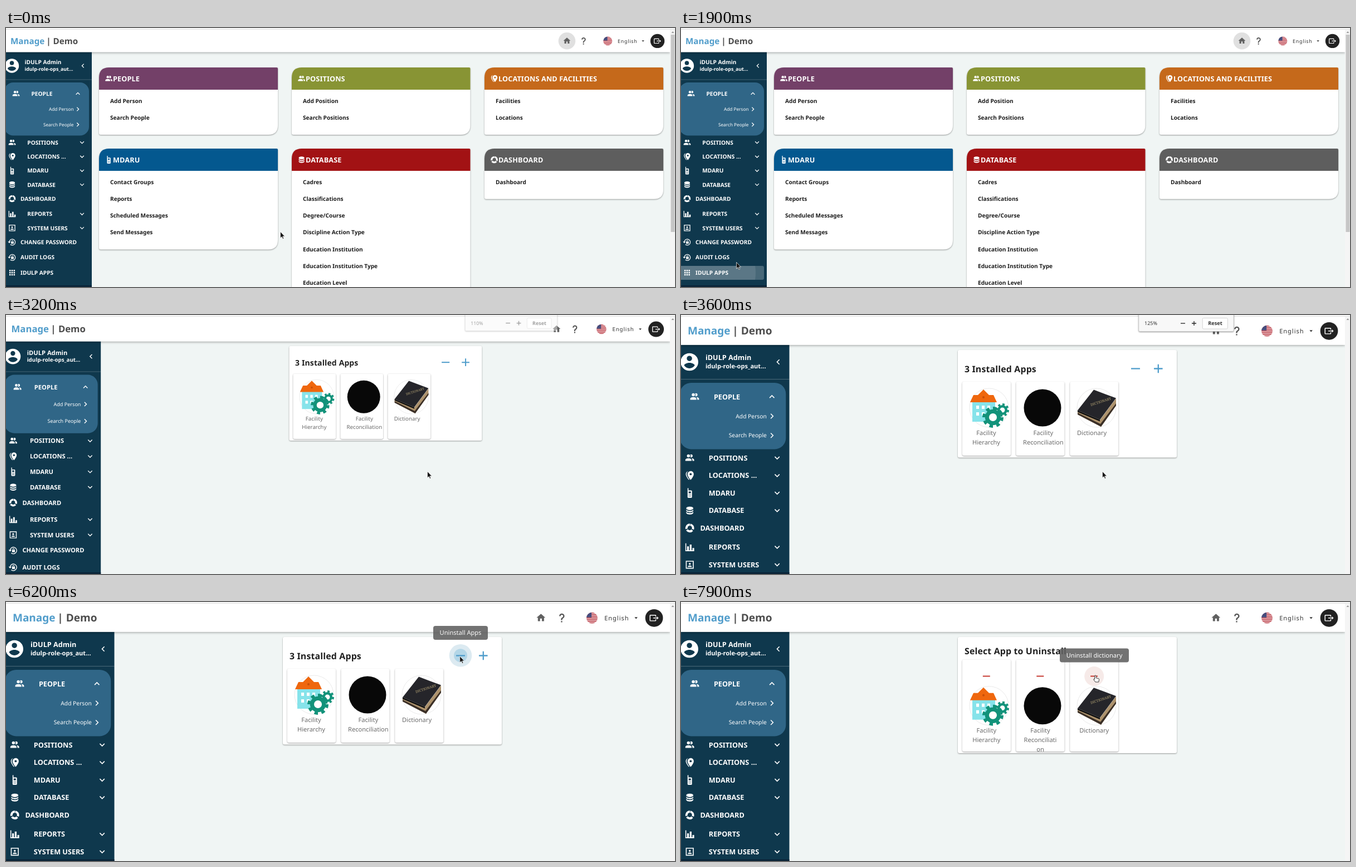
Animation of 1201 by 466 pixels, one loop 8 s. Source, as an HTML page:

```html
<!DOCTYPE html>
<html lang="en">
<head>
<meta charset="utf-8">
<title>Manage | Demo</title>
<style>
html, body { margin: 0; width: 100%; height: 100%; overflow: hidden; background: #f0f5f4; }
svg { display: block; width: 1201px; height: 466px; font-family: "Noto Sans", "Open Sans", sans-serif; text-rendering: geometricPrecision; }
.lift { filter: drop-shadow(0 1px 1.2px rgba(0,0,0,.38)); }
#bar { filter: drop-shadow(0 1.3px 2.2px rgba(0,0,0,.36)); }
</style>
</head>
<body>
<svg id="stage" viewBox="0 0 1201 466" xmlns="http://www.w3.org/2000/svg"></svg>
<script>
const LOOP = 8000, STEP = 100, RIGHT = 1193.5, MID = 693.75;
const stage = document.getElementById('stage');

const line = (d, w = 2) => `<path d="${d}" fill="none" stroke="currentColor" stroke-width="${w}"/>`;
const fill = d => `<path d="${d}" fill-rule="evenodd"/>`;
const rect = (x, y, w, h, c, more = '') => `<rect x="${x}" y="${y}" width="${w}" height="${h}" fill="${c}" ${more}/>`;
const circle = (x, y, r, c, more = '') => `<circle cx="${x}" cy="${y}" r="${r}" fill="${c}" ${more}/>`;
const text = (s, x, y, size, c, weight = 700, more = '') =>
  `<text x="${x}" y="${y}" font-size="${size}" fill="${c}" font-weight="${weight}" ${more}>${s}</text>`;
const middle = 'text-anchor="middle"';

// Icons on a 24 unit grid
const icons = {
  people: circle(9, 7.5, 3.5, 'currentColor') + fill('M16 17v2H2v-2s0-4 7-4 7 4 7 4z') +
    fill('M15.94 13A5.3 5.3 0 0 1 18 17v2h4v-2s0-3.630-6.060-4z') +
    fill('M15 4a3.400 3.400 0 0 0-1.930.6 5 5 0 0 1 0 5.800A3.400 3.400 0 0 0 15 11a3.500 3.500 0 0 0 0-7z'),
  pin: fill('M14 2c3.860 0 7 3.130 7 7 0 5.250-7 13-7 13S7 14.250 7 9a7 7 0 0 1 7-7zm0 4.500a2.500 2.500 0 1 0 0 5 2.500 2.500 0 0 0 0-5z') +
    fill('M5 9c0 4.500 5.080 10.660 6 11.800L10 22S3 14.250 3 9c0-3.170 2.110-5.850 5-6.710C6.160 3.940 5 6.330 5 9z'),
  phone: fill('M7 1h2v5h6q2 0 2 2v13q0 2-2 2H9q-2 0-2-2zM9.500 8.500v4h5v-4zM9.500 15v1.500h2V15zM12.500 15v1.500h2V15zM9.500 18.500V20h2v-1.500zM12.500 18.500V20h2v-1.500z'),
  base: '<ellipse cx="12" cy="7" rx="8" ry="4"/>' +
    [9, 14].map(y => fill(`M4 ${y}v3c0 2.210 3.580 4 8 4s8-1.790 8-4v-3c0 2.210-3.580 4-8 4s-8-1.790-8-4z`)).join(''),
  donut: '<circle cx="12" cy="12" r="7.500" fill="none" stroke="currentColor" stroke-width="5" stroke-dasharray="13.500 2.208" transform="rotate(-82 12 12)"/>',
  bars: fill('M22 21H2V3h2v16h2v-9h4v9h2V6h4v13h2v-5h4z'),
  badge: line('M4 4h16v16H4z') + circle(12, 10, 2.25, 'currentColor') + fill('M7.500 17v-.75c0-1.500 3-2.250 4.500-2.250s4.500.75 4.500 2.250V17z'),
  lock: line('M4 13a8.500 8.500 0 1 1 3 6') + fill('M0 11h8l-4 4.500z') +
    fill('M9 11h7.500v6H9z') + line('M10.700 11V9.500a2 2 0 0 1 4 0V11', 1.500),
  grid: [4, 10, 16].map(x => [4, 10, 16].map(y => rect(x, y, 4, 4, 'currentColor')).join('')).join(''),
  user: fill('M12 2a10 10 0 1 0 0 20 10 10 0 0 0 0-20zm0 3a3 3 0 1 1 0 6 3 3 0 0 1 0-6zm0 14.200c-2.500 0-4.710-1.280-6-3.200.03-2 4-3.100 6-3.100s5.970 1.100 6 3.100a7.230 7.230 0 0 1-6 3.200z'),
  down: line('M6.700 9.300l5.300 5.300 5.300-5.300'),
  up: line('M6.700 14.700l5.300-5.300 5.300 5.300'),
  next: line('M9.300 6.700l5.300 5.300-5.300 5.300'),
  back: line('M14.700 6.700L9.400 12l5.300 5.300'),
  home: fill('M10 20v-6h4v6h5v-8h3L12 3 2 12h3v8z'),
  help: fill('M10 19h3v3h-3zM12 2c5.350.22 7.680 5.620 4.500 9.670-.83 1-2.170 1.660-2.830 2.500C13 15 13 16 13 17h-3c0-1.670 0-3.080.67-4.080.66-1 2-1.590 2.830-2.250C15.920 8.430 15.320 5.260 12 5a3 3 0 0 0-3 3H6a6 6 0 0 1 6-6z'),
  exit: fill('M23 12l-4-4v3h-9v2h9v3z') + line('M16 9V6q0-1-1-1H3Q2 5 2 6v12q0 1 1 1h12q1 0 1-1v-3')
};
const icon = (name, x, y, c = '#fff', size = 15.2) =>
  `<g transform="translate(${x - size / 2} ${y - size / 2}) scale(${size / 24})" color="${c}" fill="currentColor">${icons[name]}</g>`;

function dashCard(x, y, w, color, glyph, title, items) {
  const head = y + 40, end = head + 20.6 + 30.2 * items.length, r = x + w;
  return `<path class="lift" fill="#fff" d="M${x + 18} ${y}H${r - 2}q2 0 2 2V${end - 17}q0 17-17 17H${x + 3}q-3 0-3-3V${y + 18}q0-18 18-18z"/>` +
    `<path fill="${color}" d="M${x + 18} ${y}H${r - 2}q2 0 2 2V${head}H${x}V${y + 18}q0-18 18-18z"/>` +
    icon(glyph, x + 17.6, y + 20, '#fff', 15.2) +
    text(title, x + 25, y + 24.7, 12.66, '#fff', 700, 'letter-spacing=".13"') +
    items.map((s, i) => text(s, x + 20, head + 23.7 + 30.2 * i, 10.13, '#1c1c1c')).join('');
}

const dash =
  dashCard(167, 71, 321, '#734068', 'people', 'PEOPLE', ['Add Person', 'Search People']) +
  dashCard(513, 71, 320.5, '#889434', 'people', 'POSITIONS', ['Add Position', 'Search Positions']) +
  dashCard(859, 71, 321, '#c5691b', 'pin', 'LOCATIONS AND FACILITIES', ['Facilities', 'Locations']) +
  dashCard(167, 217, 321, '#04588f', 'phone', 'MDARU', ['Contact Groups', 'Reports', 'Scheduled Messages', 'Send Messages']) +
  dashCard(513, 217, 320.5, '#a21214', 'base', 'DATABASE', ['Cadres', 'Classifications', 'Degree/Course',
    'Discipline Action Type', 'Education Institution', 'Education Institution Type', 'Education Level', 'Education Major']) +
  dashCard(859, 217, 321, '#5e5e5e', 'donut', 'DASHBOARD', ['Dashboard']);

const menu = [
  ['people', 'POSITIONS', 206, 1], ['pin', 'LOCATIONS ...', 231.4, 1], ['phone', 'MDARU', 256.6, 1],
  ['base', 'DATABASE', 281.8, 1], ['donut', 'DASHBOARD', 307, 0], ['bars', 'REPORTS', 334.6, 1],
  ['badge', 'SYSTEM USERS', 359.8, 1], ['lock', 'CHANGE PASSWORD', 385, 0], ['lock', 'AUDIT LOGS', 412.5, 0],
  ['grid', 'IDULP APPS', 440.2, 0]
];
const side =
  rect(-8, 40, 162, 440, '#0f384d') + icon('user', 10.5, 68, '#fff', 30.4) +
  text('iDULP Admin', 33.5, 65.2, 10.13, '#fff') +
  text('idulp-role-ops_aut...', 33.5, 76.9, 8.86, '#fff') +
  icon('back', 138, 68) + rect(-8, 92.5, 162, .8, '#fff', 'opacity=".25"') +
  rect(-3, 98, 152, 95.5, '#306687', 'rx="16"') +
  icon('people', 18, 118) + text('PEOPLE', 45.5, 121.8, 10.13, '#fff') + icon('up', 129, 118) +
  [['Add Person', 146], ['Search People', 173.8]].map(([s, y]) =>
    text(s, 121.5, y + 3, 8.23, '#fff', 400, 'text-anchor="end"') + icon('next', 129, y)).join('') +
  '<g clip-path="url(#row)"><rect id="hover" x="-3" y="428" width="152" height="25" rx="3" fill="#fff"/>' +
  '<circle id="wave" cx="48" cy="440" fill="#fff" opacity=".1"/></g>' +
  menu.map(([g, s, y, sub]) => icon(g, 11, y) + text(s, sub ? 38.3 : 26, y + 3.7, 10.13, '#fff') +
    (sub ? icon('down', 136.5, y) : '')).join('');

const flag = '<g clip-path="url(#disc)">' + rect(1072, 15, 17, 17, '#f0e6e8') +
  [0, 1, 2, 3, 4, 5, 6].map(i => rect(1072, 15.4 + i * 2.4, 17, 1.4, '#c0404a')).join('') +
  rect(1072, 15.4, 7.6, 7.2, '#454c7c') + '</g>';
const tools =
  circle(1007, 23.3, 15.3, '#e0e0e0', 'id="homeSpot"') + icon('home', 1007, 23, '#616161') +
  icon('help', 1037, 23.3, '#555') + flag +
  text('English', 1098, 26.7, 8.86, '#333', 500, 'letter-spacing=".79"') +
  '<path d="M1141.400 22.200h4.400l-2.200 2.500z" fill="#333"/>' +
  circle(1169.5, 23.4, 12.7, '#222') + icon('exit', 1169.5, 23.4, '#fff', 14);

const gear = (x, y, r) => `<g fill="none" stroke="#12927a">` +
  circle(x, y, r * .84, 'none', `stroke-width="${r * .32}" pathLength="160" stroke-dasharray="10 10"`) +
  circle(x, y, r * .56, '#fff', `stroke-width="${r * .38}"`) + '</g>';
const ring = (x, y = 167) => circle(x, y, 35, '#fff', 'stroke="#e4e4e4" stroke-width=".8"');
const house = ring(553) + rect(523, 156, 41, 36, '#86e3ea') +
  '<path d="M519 157l6-13h8l10-10 10 10h8l6 13z" fill="#ef670e"/>' +
  [530, 540, 550].map(x => rect(x, 163, 5, 6, '#fff') + rect(x, 175, 5, 6, '#fff')).join('') +
  circle(543, 148, 2, '#c94f08') + circle(560, 184, 14, '#fff') + gear(577, 171, 12) + gear(560, 184, 19);
const dot = circle(649, 167, 33.5, '#080808');
const book = ring(746) +
  '<path d="M712 172v7l42 22 27-38v-13l-29 39z" fill="#ad926c"/>' +
  '<path d="M712 176l41 20 28-37v4l-27 38-42-22z" fill="#3a2f27"/>' +
  '<path d="M741 134.500l40 15-29 39-40-17z" fill="#25252a"/>' +
  '<path d="M712 171.500l40 17v3l-40-17z" fill="#111"/>' +
  `<text transform="translate(736 164) rotate(-18)" font-family="Noto Serif, serif" font-size="6.300" fill="#b9a878">DICTIONARY</text>`;

const label = (rows, x, y) => rows.map((s, i) => text(s, x, y + i * 17.4, 11.08, '#6b6b6b', 400, middle)).join('');
const tile = (x, y, h, id) => rect(x, y, 87, h, '#fff', `rx="3" class="lift" ${id ? `id="${id}"` : ''}`);
const title = (s, y) => text(s, 509, y, 15.83, '#1f1f1f', 700, 'letter-spacing=".18"');
const xs = [505, 601.5, 698.3];
const installed =
  rect(497, 63, 393, 193.5, '#fff', 'rx="3" class="lift"') + title('3 Installed Apps', 102.9) +
  circle(816, 96.3, 20.3, '#dceaf1', 'id="spot"') + circle(816, 96.3, 12, '#b3d6e7', 'id="pulse"') +
  `<g color="#4f9dcb">${line('M808 96.500h16', 2.300)}${line('M849 96.500h15.600M856.800 88.700v15.600', 2.300)}</g>` +
  xs.map((x, i) => tile(x, 120, 133, i == 2 && 'bookTile')).join('') + house + dot + book +
  label(['Facility', 'Hierarchy'], 548, 215.6) + label(['Facility', 'Reconciliation'], 650.3, 215.6) +
  label(['Dictionary'], 737.5, 215.6);
const removing =
  rect(497, 63, 393, 209, '#fff', 'rx="3" class="lift"') + title('Select App to Uninstall', 94.4) +
  xs.map(x => tile(x, 103.5, 165.5)).join('') +
  circle(741.7, 133.6, 17.5, '#f6eae8', 'id="redSpot"') +
  `<g color="#c63a32">${xs.map(x => line(`M${x + 36.8} 133.500h13`, 2)).join('')}</g>` +
  `<g transform="translate(0 19.700)">${house + dot + book}</g>` +
  label(['Facility', 'Hierarchy'], 548.3, 234.6) + label(['Facility', 'Reconciliati', 'on'], 645, 234.6) +
  label(['Dictionary'], 741.7, 234.6);

const tip = (id, x, y, w, s) => `<g id="${id}">${rect(x, y, w, 25, '#616161', 'rx="4" opacity=".89"')}` +
  text(s, x + w / 2, y + 16.4, 11.08, '#fff', 400, middle) + '</g>';
const popup = '<g id="popup">' + rect(821.7, -4, 170.5, 33.5, '#f8f8f8', 'rx="2" stroke="#c4c4c4" stroke-width=".8" class="lift"') +
  text('125%', 832, 18.3, 9, '#333', 400, 'id="percent"') +
  `<g color="#222">${line('M897 15h8', 1.300)}${line('M917 15h8M921 11v8', 1.300)}</g>` +
  rect(936.3, 5.5, 45, 19.5, '#fff', 'rx="2" stroke="#ccc" stroke-width=".8"') +
  text('Reset', 959, 18.3, 9.2, '#333', 600, middle) + '</g>';

stage.innerHTML =
  '<defs><clipPath id="disc"><circle cx="1080.300" cy="23.400" r="8"/></clipPath>' +
  '<clipPath id="row"><rect x="-8" y="428" width="157" height="25"/></clipPath></defs>' +
  rect(0, 0, 1201, 466, '#f0f5f4') + `<g id="dash">${dash}</g>` +
  `<g id="apps"><g id="installed">${installed}</g><g id="removing">${removing}</g></g>` +
  `<g id="side">${side}</g>` + rect(0, 463, 0, 3, '#0a2438', 'id="foot"') +
  '<rect id="bar" y="2" width="1192" fill="#fff"/>' +
  rect(0, 0, 1201, 2, '#fcfcfc') + rect(0, 1.8, 1201, .9, '#d6d6d6') +
  `<g id="brand">${text('Manage', 8, 28.8, 15.2, '#519dcb')}${text('| Demo', 72.3, 28.8, 15.2, '#4c4c4c')}</g>` +
  `<g id="tools">${tools}</g>` + rect(1192, 2.7, 9, 464, '#f5f5f5') +
  '<path d="M1194.500 9l2.500-3 2.500 3z" fill="#999"/>' + rect(1193.5, 12, 7, 355, '#c6c6c6', 'id="thumb"') +
  popup + tip('tipApps', 767, 43, 98, 'Uninstall Apps') + tip('tipBook', 680, 83.5, 124, 'Uninstall dictionary') +
  '<path id="arrow" d="M0 0V11.500L2.700 9.100 4.400 13 6.200 12.200 4.500 8.400H8Z" fill="#161616" stroke="#fff" stroke-width=".7"/>' +
  '<path id="hand" d="M-1.200 1.200a1.200 1.200 0 0 1 2.400 0V4.600l4.300 1q1.400.3 1.300 1.800L6 12H.2L-3 7.800q-.5-1.200.6-1.400l1.200.8z" fill="#fff" stroke="#222" stroke-width=".9"/>';

const el = {};
stage.querySelectorAll('[id]').forEach(n => el[n.id] = n);
const set = (id, attrs) => { for (const k in attrs) el[id].setAttribute(k, attrs[k]); };
const show = (id, on) => set(id, { display: on ? 'inline' : 'none' });
const ramp = (t, a, b) => Math.min(1, Math.max(0, (t - a) / (b - a)));

// Pointer path: time, x, y
const path = [
  [400, 492.5, 366.5], [500, 476, 383], [700, 316, 444.5], [800, 316, 444.5], [1100, 160, 443], [1400, 56, 440],
  [1600, 49, 438], [1800, 49, 438], [2000, 150, 405], [2300, 560, 315], [2600, 740.5, 285], [2700, 756.5, 281.5],
  [4100, 756.5, 281.5], [4300, 768, 220], [4500, 812.5, 145.5], [4700, 816.5, 104], [4900, 814.7, 97.5],
  [6900, 814.7, 97.5], [7100, 755, 140], [7300, 659, 202], [7500, 715, 165], [7700, 741, 133], [7800, 741, 131.5], [7900, 743.8, 132]
];
function pointer(t) {
  const i = path.findIndex(p => p[0] > t);
  if (i == 0) return path[0].slice(1);
  if (i < 0) return path[path.length - 1].slice(1);
  const [a, x, y] = path[i - 1], [b, u, v] = path[i], k = ramp(t, a, b);
  return [x + (u - x) * k, y + (v - y) * k];
}

function draw(t) {
  const z = t < 3200 ? 1 : t < 3400 ? 1.1 : 1.25;
  const onDash = t < 2000, edge = 162 * z - 8;
  const [x, y] = pointer(t);

  show('dash', onDash); show('apps', !onDash); show('thumb', onDash); show('homeSpot', onDash);
  const left = `translate(-8 2) scale(${z}) translate(8 -2)`;
  set('side', { transform: left });
  set('brand', { transform: left });
  set('tools', { transform: `translate(${RIGHT} 2) scale(${z}) translate(${-RIGHT} -2)` });
  set('bar', { height: 41.5 * z });
  set('foot', { width: edge });
  set('apps', { transform: `translate(${(edge + 1193) / 2} 2) scale(${z / 1.25}) translate(${-MID} -2)` });

  const over = t < 2000 && x < 149 && y > 428;
  set('hover', { opacity: t >= 1900 ? .24 : over ? .08 : 0 });
  set('wave', { r: 26 * ramp(t, 1500, 1700) + 60 * ramp(t, 1700, 1900) });
  show('wave', t >= 1600 && t < 2000);

  const gone = t >= 6400;
  show('installed', !gone); show('removing', gone);
  show('spot', t >= 4700); show('pulse', t >= 6200);
  set('pulse', { r: t < 6300 ? 12 : 20 });
  const lifted = t > 4100 && t < 4500 && x > 698 && x < 785 && y < 253;
  el.bookTile.style.filter = lifted ? 'drop-shadow(0 2px 2.5px rgba(0,0,0,.45))' : '';
  show('redSpot', t >= 7600);

  set('tipApps', { opacity: ramp(t, 4900, 5100) * (1 - ramp(t, 6300, 6600)) });
  set('tipBook', { opacity: ramp(t, 7500, 7700) });

  const soft = t < 3300;
  show('popup', t >= 3200 && t < 5300);
  set('popup', {
    opacity: soft ? .45 : t < 5000 ? 1 : t < 5100 ? .8 : .3,
    transform: soft ? 'translate(907 0) scale(.97) translate(-907 0)' : ''
  });
  el.percent.textContent = z < 1.2 ? '110%' : '125%';

  const hand = (over && x < 140) || t >= 7900;
  show('hand', hand); show('arrow', !hand);
  set(hand ? 'hand' : 'arrow', { transform: `translate(${x} ${y})` });
}

function frame() {
  const t = performance.now() % LOOP;
  draw(Math.floor(t / STEP) * STEP);
  requestAnimationFrame(frame);
}
frame();
</script>
</body>
</html>
```
